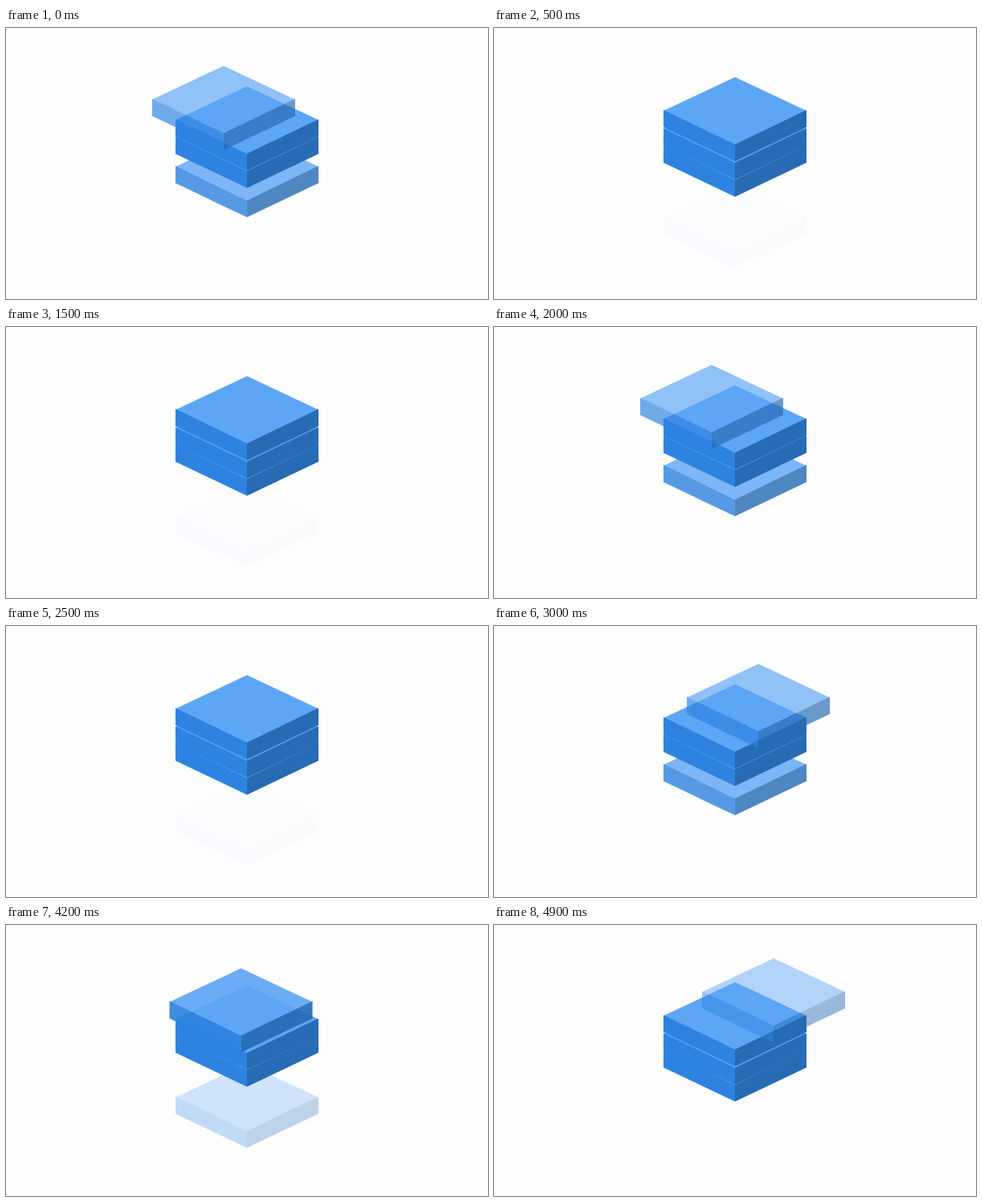
Recreate the animation shown at these times as an HTML page. Size 600 by 338 pixels, loop 5000 ms.

```html
<!DOCTYPE html>
<html lang="en">
<head>
<meta charset="utf-8">
<title>Stacking blocks</title>
<style>
  html, body { margin: 0; width: 100%; height: 100%; overflow: hidden; background: #fdfdfe; }
  svg { display: block; width: 100%; height: 100%; }
</style>
</head>
<body>
<svg id="stage" viewBox="0 0 600 338"></svg>
<script>
const NS = 'http://www.w3.org/2000/svg';
const LOOP = 5000, STEP = 1000, LEAD = 250;
const CENTER = 300, SLOT = 21, SLIDE = 90, RISE = 27, FALL = 80;

// Block faces relative to the back corner of the top face.
const FACES = [
  ['#5da5f5', '0,0 89,42 0,84 -89,42'],
  ['#2e83e1', '-89,41 0,84 0,105 -89,62.5'],
  ['#266bb4', '89,41 0,84 0,105 89,62.5']
];

const clamp = v => Math.min(1, Math.max(0, v));
const easeOut = v => 1 - (1 - clamp(v)) ** 3;
const easeInOut = v => (1 - Math.cos(Math.PI * clamp(v))) / 2;

function add(parent, tag, attrs = {}) {
  const el = document.createElementNS(NS, tag);
  for (const key in attrs) el.setAttribute(key, attrs[key]);
  return parent.appendChild(el);
}

function makeBlock() {
  const group = add(document.getElementById('stage'), 'g');
  for (const [fill, points] of FACES) add(group, 'polygon', { fill, points });
  return group;
}

// Painted oldest first, so the newest block lies on top.
const blocks = Array.from({ length: 5 }, makeBlock);

// A block slides in, sinks three slots, then falls away.
function pose(age, side) {
  const enter = easeOut(age / 800);
  const leave = easeOut((age - 3200) / 730);
  const sink = start => easeInOut((age - start) / STEP);
  return {
    x: CENTER + side * SLIDE * (1 - enter),
    y: 56 - RISE * (1 - enter) + 17.5 * sink(380)
      + SLOT * (sink(1250) + sink(2235)) + FALL * leave,
    alpha: enter * (1 - leave)
  };
}

function render(time) {
  const clock = time % LOOP + LEAD;
  const newest = Math.floor(clock / STEP);
  blocks.forEach((block, i) => {
    const index = newest - (blocks.length - 1 - i);
    const side = index % 2 === 0 ? -1 : 1;
    const { x, y, alpha } = pose(clock - index * STEP, side);
    block.setAttribute('transform', `translate(${x.toFixed(2)} ${y.toFixed(2)})`);
    block.setAttribute('opacity', alpha.toFixed(3));
  });
}

const start = performance.now();
function tick() {
  render(performance.now() - start);
  requestAnimationFrame(tick);
}
tick();
</script>
</body>
</html>
```
